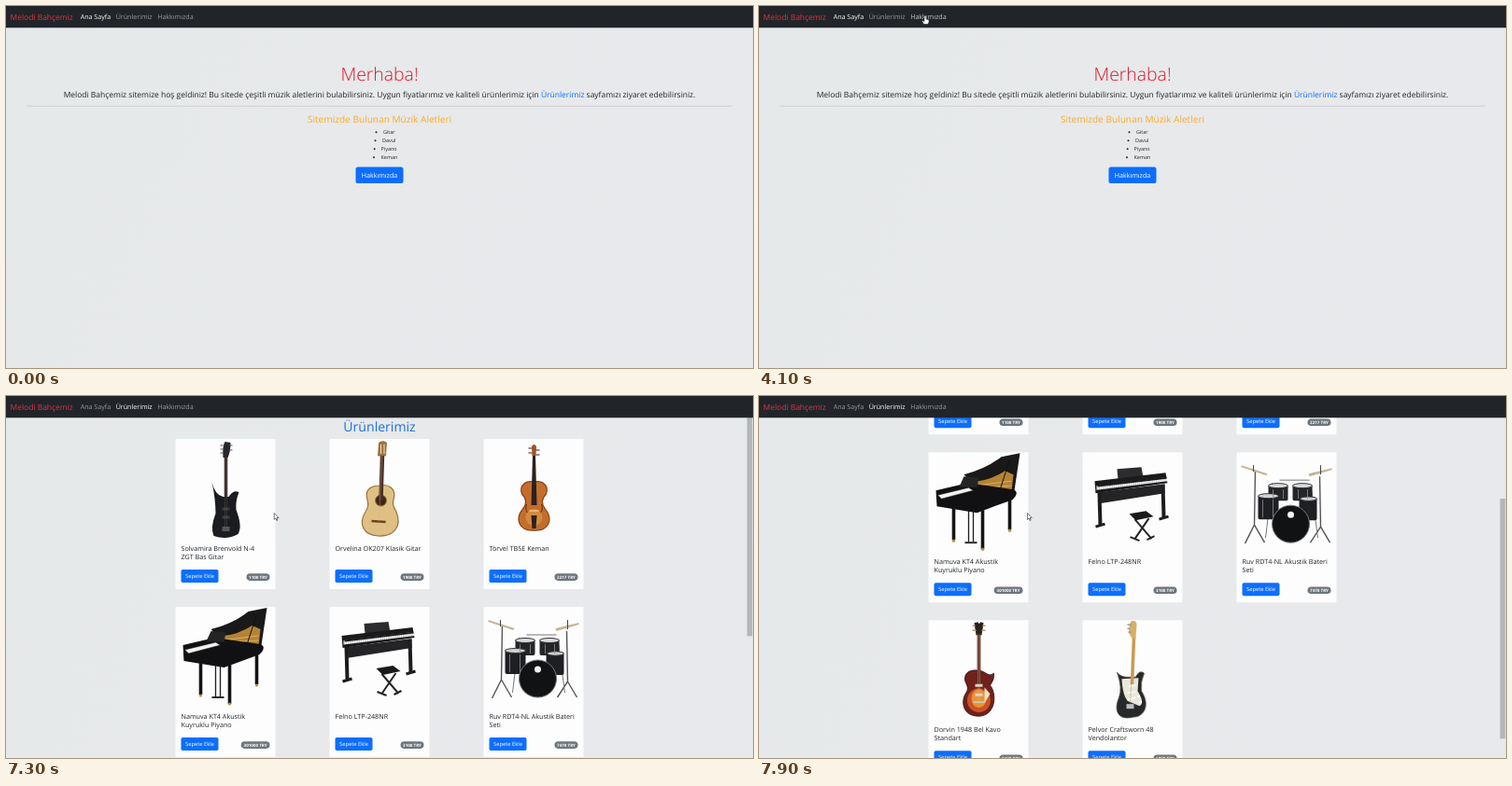
An HTML page that plays this animation: 800 by 388 pixels, repeating every 8000 ms.

```html
<!DOCTYPE html>
<html lang="tr">
<head>
<meta charset="utf-8">
<style>
  html, body { margin: 0; width: 100%; height: 100%; overflow: hidden; background: #e7e9ea; }
  svg { display: block; width: 800px; height: 388px; font-family: "Open Sans", "Noto Sans", sans-serif; text-rendering: geometricPrecision; }
  .nav { font-size: 7.1px; }
  .mid { text-anchor: middle; }
  .title { font-size: 7.2px; font-weight: 500; fill: #212529; }
</style>
</head>
<body>
<svg id="stage" viewBox="0 0 800 388"></svg>
<script>
const LOOP = 8000, SHOP_AT = 6000, SCROLL_AT = 7300, VIEW = 388, CONTENT = 585;
const BLUE = '#0d6efd', DARK_BLUE = '#0b5ed7';

const text = (x, y, size, fill, str, extra = '') =>
  `<text x="${x}" y="${y}" font-size="${size}" fill="${fill}" ${extra}>${str}</text>`;
const rect = (x, y, w, h, fill, rx = 0) =>
  `<rect x="${x}" y="${y}" width="${w}" height="${h}" rx="${rx}" fill="${fill}"/>`;
const path = (d, fill, stroke = 'none', width = 1) =>
  `<path d="${d}" fill="${fill}" stroke="${stroke}" stroke-width="${width}"/>`;
const line = (d, stroke, width) => path(d, 'none', stroke, width);
const oval = (cx, cy, rx, ry, fill, stroke = 'none') =>
  `<ellipse cx="${cx}" cy="${cy}" rx="${rx}" ry="${ry}" fill="${fill}" stroke="${stroke}"/>`;

// Instruments, drawn in a 107 x 107 box
const art = {
  bass:
    line('M54 19L54 65', '#3a2724', 3.6) +
    path('M51 20Q50 8 53 3L59 4Q59 14 56 20Z', '#28282a') +
    line('M51 7h-3M51 11h-3M51 15h-3M58 7h3M58 12h3', '#555', 1.2) +
    path('M39 46Q42 60 51 62L57 62Q62 54 68 57Q64 67 65 76Q72 94 67 102Q55 109 41 104Q37 95 43 80Q43 65 39 46Z', '#1b1c1f') +
    line('M50 75h8M50 84h8', '#3b3c40', 3) + rect(50, 94, 8, 5, '#55565a') +
    line('M53 20V95M55 20V95', '#77706c', .3),
  classical:
    path('M54 50C63 48 71 53 69 63C67 69 68 72 71 77C79 95 67 105 52 104C36 103 31 91 38 79C43 72 41 68 40 63C38 53 46 50 54 50Z', '#dfc084', '#9c713c', 1.2) +
    oval(55, 66, 6, 6, '#3b2616', '#a36f3c') +
    line('M56.5 18L55 66', '#4b3023', 4.4) +
    path('M52 18L53 4Q57 1 61 4L60 18Z', '#a9753f', '#6c4828', .6) +
    line('M55 6V16M58.5 6V16', '#efe0bc', 1) +
    line('M45 88L60 89', '#70421f', 2.4) + line('M56 18L53 88', '#c8b48e', .4),
  violin:
    path('M54 46C64 44 70 51 67 59C62 64 62 70 66 75C75 86 70 99 54 98C38 99 33 86 42 75C46 70 46 64 41 59C38 51 44 44 54 46Z', '#c46e2b', '#8a421a', 1.2) +
    oval(54, 84, 9, 9, '#d58a42') +
    path('M52.5 17H55.5L57 71H51Z', '#2b211f') +
    path('M52 18L51.5 8Q54 4 56.5 8L56 18Z', '#9b5425') +
    line('M48 10H52M48 15H52M56 12H60M56 17H60', '#37231c', 1.2) +
    path('M51 82H57L56 96H52Z', '#2b211f') + line('M49 77H59', '#f0d19c', 1.2) +
    line('M46 70Q44 76 47 79M62 70Q64 76 61 79', '#4d2414', .9),
  grand:
    path('M38 24Q62 18 78 5L98 1 92 41 47 33Z', '#19191a') +
    path('M43 31Q62 33 82 20L91 24 89 42 48 37Z', '#b58335') +
    line('M48 36L89 31M55 38L89 36', '#e4c47d', .7) +
    line('M77 39L87 8', '#111', 1) +
    path('M8 41L42 33 91 40Q98 43 90 51L52 65 9 58Z', '#111113') +
    path('M10 46L43 38 48 41 14 50Z', '#f1f1ee', '#111', .5) +
    path('M33 37L38 26 54 27 52 38Z', '#242426') +
    line('M27 60V94M58 62V104M87 51V83', '#141416', 3.6) +
    line('M43 62V96M48 62V96', '#1c1c1e', 1.3) + line('M39 97H52', '#2a2a2a', 2) +
    oval(27, 95, 1.6, 1.6, '#b08a45') + oval(58, 104, 1.6, 1.6, '#b08a45') + oval(87, 84, 1.6, 1.6, '#b08a45'),
  digital:
    path('M37 18L63 16 65 27 38 29Z', '#2c2c2e') +
    path('M13 31L89 22 91 33 14 44Z', '#1a1a1c') +
    path('M15 36L90 27 91 31 15 40.5Z', '#f4f4f2') +
    line('M16 36.5L90 27.6', '#1a1a1c', 1.8) +
    `<path d="M16 39L90 30" stroke="#777" stroke-width="3" stroke-dasharray=".3 1.5"/>` +
    path('M18 43L88 34 88 44 18 55Z', '#242427') +
    line('M18 43L19 78M86 35L87 70', '#1d1d1f', 4) +
    line('M14 80L24 77M82 72L92 69', '#1d1d1f', 3) +
    path('M50 66L68 63 76 69 57 73Z', '#19191b') +
    line('M56 72L74 93M71 71L56 93M51 91L61 95M69 94L77 90', '#242426', 2),
  drums:
    line('M20 19L19 78L9 98M19 78L30 97M89 26L90 80L79 97M90 80L100 97', '#555', 1.4) +
    line('M38 33L31 92M80 38L87 92M46 30H78', '#777', 1) +
    path('M5 14L33 23 32 25 5 16Z', '#c6b494') + path('M77 23L102 17 102 19 78 26Z', '#c6b494') +
    line('M18 14V21M90 14V24', '#444', 1) +
    rect(34, 35, 21, 17, '#242528', 2) + rect(60, 35, 21, 17, '#242528', 2) +
    rect(23, 46, 22, 26, '#1e1f22', 2) + rect(67, 49, 19, 24, '#1e1f22', 2) +
    oval(44.5, 36, 10.5, 2.5, '#d9dadb', '#333') + oval(70.5, 36, 10.5, 2.5, '#d9dadb', '#333') +
    oval(34, 47, 11, 2.5, '#d0d1d2', '#333') + oval(77, 50, 9, 2.2, '#d0d1d2', '#333') +
    line('M28 51V70M39 51V70M39 40V50M50 40V50M66 40V50M76 40V50', '#8d8f92', .8) +
    oval(58, 77, 20, 20, '#111214', '#77797c') + oval(58, 67, 3.5, 3.5, '#f2f2f2'),
  single:
    path('M54 54C62 55 64 62 70 57Q71 63 66 70C73 78 73 102 54 103C36 103 34 86 41 77C44 71 39 68 39 63C39 55 46 53 54 54Z', '#70211b', '#42181a', 1) +
    oval(54, 86, 12.5, 13, '#c75426') + oval(54, 84, 8, 10, '#e99135') +
    line('M54 15V68', '#613226', 3.8) +
    path('M51 16L49 3 53 2 54 4 56 2 59 3 57 16Z', '#29211e') +
    line('M47 6H50M47 11H51M58 6H61M57 11H61', '#b99d67', 1.5) +
    line('M50 70H58M50 80H58', '#ded6c8', 3) + line('M48 88H60', '#c8c4bd', 2) +
    line('M53 15V88M55 15V88', '#d4c0a0', .3) + path('M60 72L66 79 60 89Z', '#eee0bf'),
  double:
    path('M37 56Q42 62 50 61L57 61Q61 53 66 57Q62 66 63 76C73 91 66 104 54 104C38 108 33 97 39 83Q43 73 37 56Z', '#28292a', '#605447', .8) +
    path('M42 63L60 62 59 76Q67 89 61 92L49 87Q43 82 42 63Z', '#e9e7dc') +
    line('M55 19L53 69', '#cda056', 3.6) +
    path('M53 20L50 14Q49 6 52 1Q58 0 58 5L57 20Z', '#d8ae68') +
    line('M48 5H52M48 9H51M49 13H52', '#888', 1.2) +
    line('M49 71L57 70M48 78L57 77M48 86L57 83', '#f9f7ef', 2.4) +
    rect(47, 90, 8, 5, '#bbbcbe') + line('M55 19L51 90', '#a78a5a', .4) +
    oval(60, 82, 1.3, 1.3, '#fff') + oval(62, 88, 1.3, 1.3, '#fff')
};

const products = [
  ['bass', 1100, 'Solvamira Brenvold N-4', 'ZGT Bas Gitar'],
  ['classical', 1900, 'Orvelina OK207 Klasik Gitar'],
  ['violin', 2217, 'Törvel TB5E Keman'],
  ['grand', 301000, 'Namuva KT4 Akustik', 'Kuyruklu Piyano'],
  ['digital', 3100, 'Felno LTP-248NR'],
  ['drums', 7470, 'Ruv RDT4-NL Akustik Bateri', 'Seti'],
  ['single', 7420, 'Dorvin 1948 Bel Kavo', 'Standart'],
  ['double', 6000, 'Pelvor Craftsworn 48', 'Vendolantor']
];

function card([kind, price, ...lines], i) {
  const badge = `${price} TRY`, w = 25 + (badge.length - 8) * 2.9;
  return `<g transform="translate(${181.5 + i % 3 * 165} ${46 + Math.floor(i / 3) * 180})">` +
    rect(0, 0, 107, 161, '#fdfdfd', .8) + art[kind] +
    lines.map((s, n) => `<text class="title" x="6" y="${119.6 + n * 9}">${s}</text>`).join('') +
    rect(6, 140, 40, 14, BLUE, 1.8) + text(26, 149.2, 5.8, '#fff', 'Sepete Ekle', 'class="mid"') +
    rect(101 - w, 144.3, w, 7.6, '#6c757d', 3.8) +
    text(101 - w / 2, 149.8, 4.5, '#fff', badge, 'class="mid" font-weight="700"') + '</g>';
}

const list = [['Gitar', 404, 396.5], ['Davul', 403, 395.5], ['Piyano', 401.5, 394.7], ['Keman', 401.5, 394]]
  .map(([s, x, dot], i) => oval(dot, 135.3 + i * 9, 1, 1, '#212529') + text(x, 137.1 + i * 9, 5.45, '#212529', s)).join('');

const links = [['Ana Sayfa', 80, 112], ['Ürünlerimiz', 118, 157], ['Hakkımızda', 162.5, 201]];

const home = text(400, 80, 19.4, '#dc1626', 'Merhaba!', 'class="mid" font-weight="300"') +
  text(400, 97.7, 8.48, '#212529', 'Melodi Bahçemiz sitemize hoş geldiniz! Bu sitede çeşitli müzik aletlerini bulabilirsiniz. ' +
    `Uygun fiyatlarımız ve kaliteli ürünlerimiz için <tspan fill="${BLUE}">Ürünlerimiz</tspan> sayfamızı ziyaret edebilirsiniz.`, 'class="mid"') +
  line('M22.5 107.3H777.5', '#c9cbcc', .8) +
  text(400, 125, 10.1, '#f9ac2c', 'Sitemizde Bulunan Müzik Aletleri', 'class="mid" font-weight="500"') + list +
  `<rect id="about" x="374.5" y="172.5" width="51" height="17.6" rx="2.6"/>` +
  text(400, 184, 7.1, '#fff', 'Hakkımızda', 'class="mid"');

const $ = id => document.getElementById(id);
$('stage').innerHTML =
  `<linearGradient id="bg" x2="1" y2=".25"><stop stop-color="#e6e9e9"/><stop offset="1" stop-color="#e8e9ec"/></linearGradient>` +
  rect(0, 0, 800, 388, 'url(#bg)') +
  `<g id="home">${home}</g><g id="shop"><g id="content">` +
  text(400, 38.2, 14.1, '#1b70e4', 'Ürünlerimiz', 'class="mid" font-weight="500"') +
  products.map(card).join('') + '</g>' +
  `<rect id="thumb" x="793.6" width="5.6" height="${VIEW * VIEW / CONTENT}" fill="#b3b6b9"/></g>` +
  rect(0, 0, 800, 23.3, '#212529') + text(4.6, 15.2, 8.45, '#dc3545', 'Melodi Bahçemiz') +
  links.map(([s, x], i) => `<text class="nav" id="link${i}" x="${x - .3}" y="14.4" fill="#fff">${s}</text>`).join('') +
  `<g id="cursor" stroke="#222" stroke-width=".6">
    <path id="hand" fill="#fff" d="M-1 1Q0-1 1 1V4L4 4.8V7.2L3 9.5H-1.5L-3.3 6.3-2.5 5.5-1 6.6Z"/>
    <path id="arrow" fill="#fff" d="M0 0V7L1.6 5.5 2.7 8 3.7 7.5 2.6 5.1H4.8Z"/></g>`;

// Pointer path: time, x, y
const pointer = [
  [2100, 412, 184], [2300, 402, 186], [2400, 402, 186], [2800, 178, 21], [2900, 178, 21],
  [3300, 139, 9], [3400, 139, 9], [3500, 137, 9], [3600, 137, 9], [3800, 178, 10], [4000, 178, 10],
  [4100, 178, 10], [4800, 45, 9], [5100, 45, 9], [5400, 134, 9], [6500, 134, 9], [6600, 287, 125.5], [8000, 287.5, 125.5]
];

function pointerAt(t) {
  const i = Math.max(1, pointer.findIndex(p => p[0] >= t));
  const [a, b] = [pointer[i - 1], pointer[i]], k = (t - a[0]) / (b[0] - a[0]);
  return [a[1] + (b[1] - a[1]) * k, a[2] + (b[2] - a[2]) * k];
}

const show = (id, on) => $(id).setAttribute('visibility', on ? 'visible' : 'hidden');

function draw(now) {
  const t = Math.floor(now % LOOP / 100) * 100, inShop = t >= SHOP_AT, visible = t >= pointer[0][0];
  const [x, y] = visible ? pointerAt(t) : [-99, -99];
  const onNav = (from, to) => y > 3 && y < 20 && x >= from && x <= to;
  const onButton = !inShop && x > 374 && x < 426 && y > 172 && y < 190;
  const hand = onButton || onNav(4, 71) || links.some(l => onNav(l[1], l[2]));

  $('home').style.display = inShop ? 'none' : '';
  $('shop').style.display = inShop ? '' : 'none';
  links.forEach((l, i) => $('link' + i).setAttribute('fill-opacity',
    i === +inShop ? 1 : onNav(l[1], l[2]) ? .75 : .55));
  $('about').setAttribute('fill', onButton ? DARK_BLUE : BLUE);

  const s = Math.max(0, t - SCROLL_AT) / 1000, scroll = 334 * s - 96 * s * s;
  $('content').setAttribute('transform', `translate(0 ${-scroll})`);
  $('thumb').setAttribute('y', scroll * VIEW / CONTENT);

  $('cursor').setAttribute('transform', `translate(${x} ${y})`);
  show('hand', visible && hand);
  show('arrow', visible && !hand);
  requestAnimationFrame(draw);
}
draw(performance.now());
</script>
</body>
</html>
```
